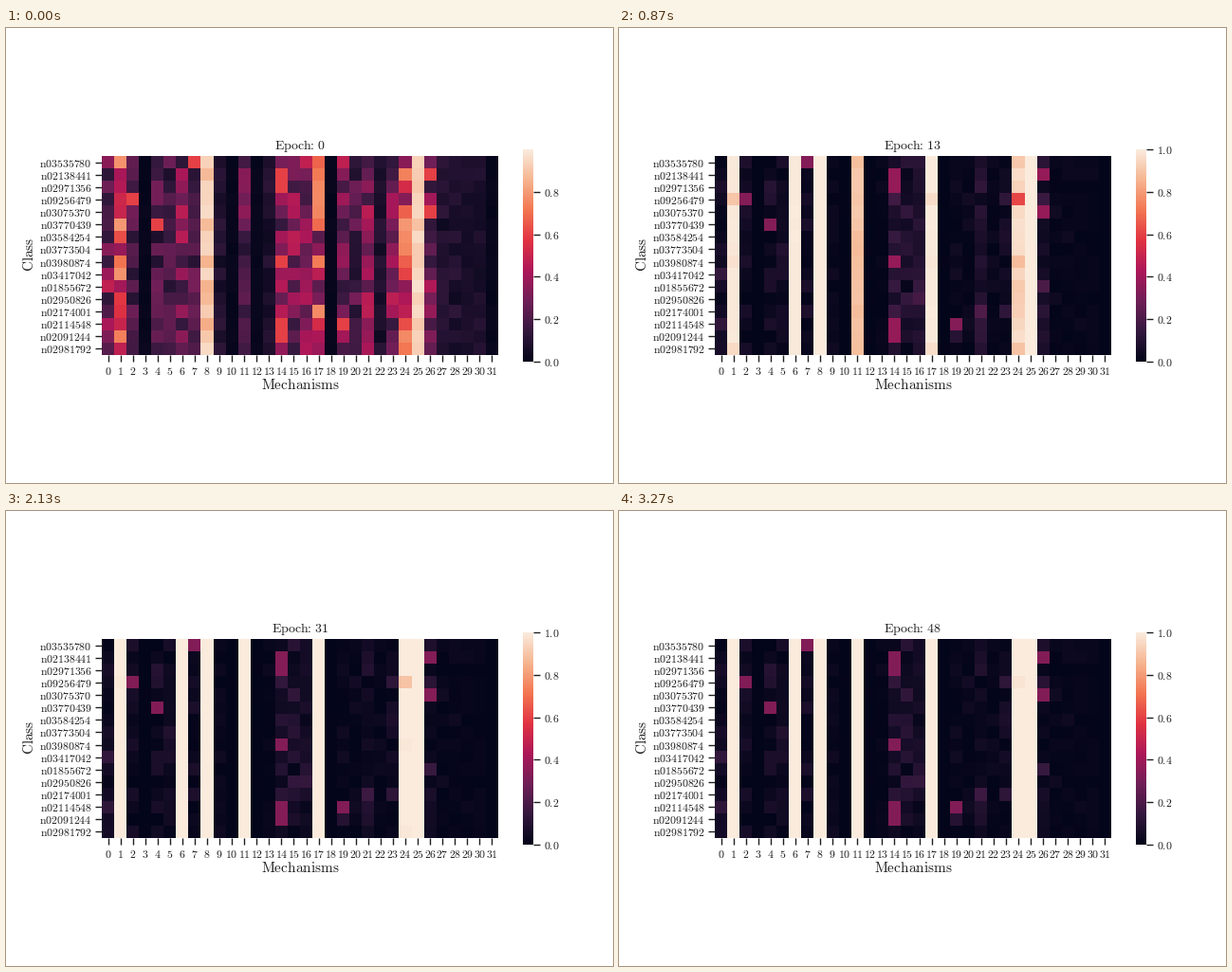
Write a matplotlib script that moves like this. It is 640 by 480 pixels and loops after 3340 ms.

```python
import numpy as np
import matplotlib.pyplot as plt
from matplotlib.animation import FuncAnimation
from matplotlib.colors import LinearSegmentedColormap

W, H, DPI = 640, 480, 100
EPOCHS, LOOP_MS = 50, 3340
CLASSES = """n03535780 n02138441 n02971356 n09256479 n03075370 n03770439
n03584254 n03773504 n03980874 n03417042 n01855672 n02950826
n02174001 n02114548 n02091244 n02981792""".split()
ROWS, COLS = len(CLASSES), 32
INK = "0.12"
HEAT = LinearSegmentedColormap.from_list("heat", [
    "#03051a", "#35193e", "#701f57", "#ad1759",
    "#e13342", "#f37651", "#f6b48f", "#faebdd"])

# Mechanisms that win: (initial weight, epochs to converge, steepness)
WINNERS = {1: (.58, 3.3, 1), 6: (.3, 2.6, 1), 8: (.9, .9, 1), 11: (.24, 8, 1.4),
           17: (.5, 2.8, 1), 24: (.58, 8, 1.4), 25: (.93, .9, 1)}
BUSY = [0, 14, 15, 16, 19, 21, 23, 26]
MILD = [2, 4, 5, 7, 20]
IDLE = [3, 10, 12, 18, 31]
SLOW = [14, 16, 21, 26]
# (class, mechanism) pairs that keep a visible weight
LINGERING = [(0, 7), (1, 14), (1, 26), (2, 14), (3, 2), (4, 26),
             (5, 4), (8, 14), (13, 14), (13, 19), (14, 14)]

rng = np.random.default_rng(7)
level = np.full(COLS, .08)
level[BUSY], level[MILD], level[IDLE] = .3, .19, .015
tau = np.full((ROWS, COLS), 3.0)
tau[:, SLOW] = 7
power = np.ones(COLS)
for col, (start, epochs, steepness) in WINNERS.items():
    level[col], tau[:, col], power[col] = start, epochs, steepness

spread = .6 * np.minimum(level, 1 - level)
first = level + spread * rng.uniform(-1, 1, (ROWS, COLS))
last = .35 * first * rng.random((ROWS, COLS))
for cell in LINGERING:
    first[cell], last[cell] = .6, .33
last[:, list(WINNERS)] = 1

# A few classes lag behind on the contested mechanisms
contested = [1, 17, 24]
tau[3, contested] *= 2.5
for row in (8, 15):
    tau[row, contested] *= 1.6


def weights(epoch):
    return last + (first - last) * np.exp(-(epoch / tau) ** power)


def rm(text):
    return rf"$\mathrm{{{text}}}$"


def pixel_axes(left, top, right, bottom):
    ax = fig.add_axes([left / W, 1 - bottom / H, (right - left) / W, (bottom - top) / H])
    ax.spines[:].set_visible(False)
    ax.tick_params(length=4.8, width=1, pad=2.8, labelsize=8.5,
                   color=INK, labelcolor=INK)
    return ax


def label(x, y, text, size, **kw):
    return fig.text(x / W, 1 - y / H, text, size=size, color=INK, ha="center", **kw)


plt.rcParams["mathtext.fontset"] = "cm"
fig = plt.figure(figsize=(W / DPI, H / DPI), dpi=DPI, facecolor="white")

ax = pixel_axes(101, 135, 519, 345)
image = ax.imshow(first, cmap=HEAT, vmin=0, vmax=1, aspect="auto",
                  interpolation="nearest")
ax.set_xticks(range(COLS), [rm(i) for i in range(COLS)])
ax.set_yticks(range(ROWS), [rm(name) for name in CLASSES])
ax.tick_params(axis="y", pad=2.5)

bar = pixel_axes(545, 128, 556, 352)
bar.imshow(np.linspace(0, 1, 256)[:, None], cmap=HEAT, vmin=0, vmax=1,
           aspect="auto", origin="lower", extent=(0, 1, 0, 1))
bar.set_xticks([])
bar.yaxis.tick_right()

title = label(310, 127.6, "", 10, va="baseline")
label(310, 381, rm("Mechanisms"), 11, va="baseline")
label(24.3, 239, rm("Class"), 11, va="center", rotation=90)


def update(epoch):
    image.set_data(weights(epoch))
    title.set_text(rf"$\mathrm{{Epoch}}\text{{:}}\ \mathrm{{{epoch}}}$")
    ticks = np.arange(6 if epoch else 5) / 5
    bar.set_yticks(ticks, [rm(f"{t:.1f}") for t in ticks])
    return image, title


anim = FuncAnimation(fig, update, frames=EPOCHS, interval=LOOP_MS / EPOCHS,
                     repeat=True, repeat_delay=0)
plt.show()
```
